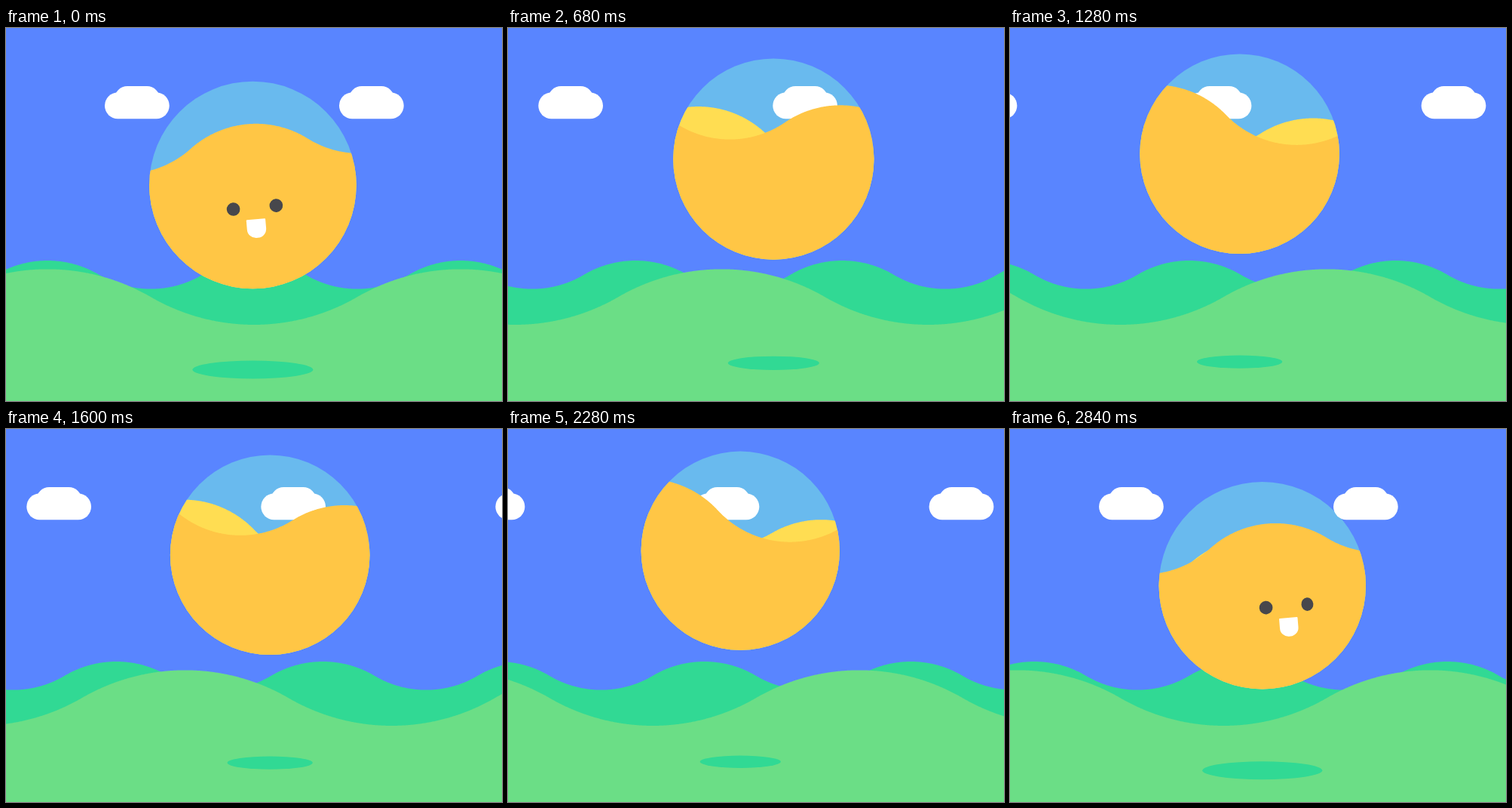
Recreate the animation shown at these times as an HTML page with a canvas. Size 658x494 px, loop 2880 ms.

```html
<!DOCTYPE html>
<html lang="en">
<head>
<meta charset="utf-8">
<title>Bouncing ball</title>
<style>
  html, body { margin: 0; width: 100%; height: 100%; overflow: hidden; background: #5985ff; }
  canvas { display: block; }
</style>
</head>
<body>
<canvas id="stage" width="658" height="494"></canvas>
<script>
const ctx = document.getElementById('stage').getContext('2d');
const WIDTH = 658, HEIGHT = 494;
const PERIOD = 960, STEP = 40;
const SKY = '#5985ff', GLASS = '#69baee', LIQUID = '#ffc645', LIQUID_BACK = '#ffdd52';
const HILL = '#6bde86', HILL_BACK = '#31d994', EYE = '#47474c', WHITE = '#fff';

const ease = u => u ** 1.75 / (u ** 1.75 + (1 - u) ** 1.75);
const thereAndBack = p => ease(1 - Math.abs(1 - 2 * (p % 1)));

// Wave built from alternating circular arcs, with a crest at x = 0.
function arcWave(x, length, amp) {
  const half = length / 2, n = Math.round(x / half), d = x - n * half;
  const r = ((half / 2) ** 2 + amp ** 2) / (2 * amp);
  const height = amp - (r - Math.sqrt(r * r - d * d));
  return n % 2 ? height : -height;
}

function fillWave(color, from, to, bottom, crest, length, level, amp) {
  ctx.fillStyle = color;
  ctx.beginPath();
  ctx.moveTo(from, bottom);
  for (let x = from; x <= to; x++) ctx.lineTo(x, level + arcWave(x - crest, length, amp));
  ctx.lineTo(to, bottom);
  ctx.fill();
}

function ellipse(color, x, y, rx, ry = rx) {
  ctx.fillStyle = color;
  ctx.beginPath();
  ctx.ellipse(x, y, rx, ry, 0, 0, Math.PI * 2);
  ctx.fill();
}

function roundRect(color, x, y, w, h, radii) {
  ctx.fillStyle = color;
  ctx.beginPath();
  ctx.roundRect(x, y, w, h, radii);
  ctx.fill();
}

function drawClouds(p) {
  const gap = 311;
  for (let x = 131 + gap * (p - 2); x < WIDTH; x += gap) {
    roundRect(WHITE, x, 85.5, 85.7, 34.7, 17.3);
    roundRect(WHITE, x + 13, 77, 60, 34, 17);
  }
}

function drawFace(turn) {
  const radius = 119, eyeAngle = Math.asin(28.5 / radius);
  for (const a of [-eyeAngle, eyeAngle]) {
    const squash = Math.cos(a - turn);
    if (squash > 0) ellipse(EYE, radius * Math.sin(a - turn), 29.7, 8.9 * Math.min(1, squash + 0.02), 8.8);
  }
  const squash = Math.cos(turn);
  if (squash > 0) {
    const w = 25.4 * squash;
    roundRect(WHITE, -radius * Math.sin(turn) - w / 2, 45.5, w, 24.7, [1, 1, w * 0.47, w * 0.47]);
  }
}

function rotated(angle, draw) {
  ctx.save();
  ctx.rotate(angle);
  draw();
  ctx.restore();
}

function draw(p) {
  const turn = p * Math.PI * 2;
  const lift = thereAndBack(p);
  const x = 327.4 + 25.7 * (1 - 2 * thereAndBack(p + 0.25));
  const y = 208 - 53.6 * lift, r = 137.3 - 6.5 * lift;

  ctx.fillStyle = SKY;
  ctx.fillRect(0, 0, WIDTH, HEIGHT);
  fillWave(HILL_BACK, 0, WIDTH, HEIGHT, 55 + 548 * p, 274, 326.8, 18.8);
  fillWave(HILL, 0, WIDTH, HEIGHT, 55 + 1096 * p, 548, 356.2, 36.8);
  ellipse(HILL_BACK, x, 452.5 - 13.5 * lift, 80 - 30.3 * lift, 12 - 4.4 * lift);
  ellipse(GLASS, x, y, r);
  drawClouds(p);

  ctx.save();
  ctx.translate(x, y);
  ctx.beginPath();
  ctx.arc(0, 0, r, 0, Math.PI * 2);
  ctx.clip();
  const tilt = 0.052 - 0.139 * Math.cos(turn), slosh = 0.045 * Math.sin(turn);
  const level = -55 + 9 * lift, length = 312;
  rotated(tilt - slosh, () =>
    fillWave(LIQUID_BACK, -160, 160, 160, length * p, length, level + 17 + 2 * lift, 26));
  rotated(tilt + slosh, () =>
    fillWave(LIQUID, -160, 160, 160, -length * p, length, level, 26));
  rotated(tilt, () => drawFace(turn));
  ctx.restore();
}

function tick() {
  const step = Math.floor(performance.now() / STEP + 0.01);
  draw(step * STEP % PERIOD / PERIOD);
  requestAnimationFrame(tick);
}
tick();
</script>
</body>
</html>
```
